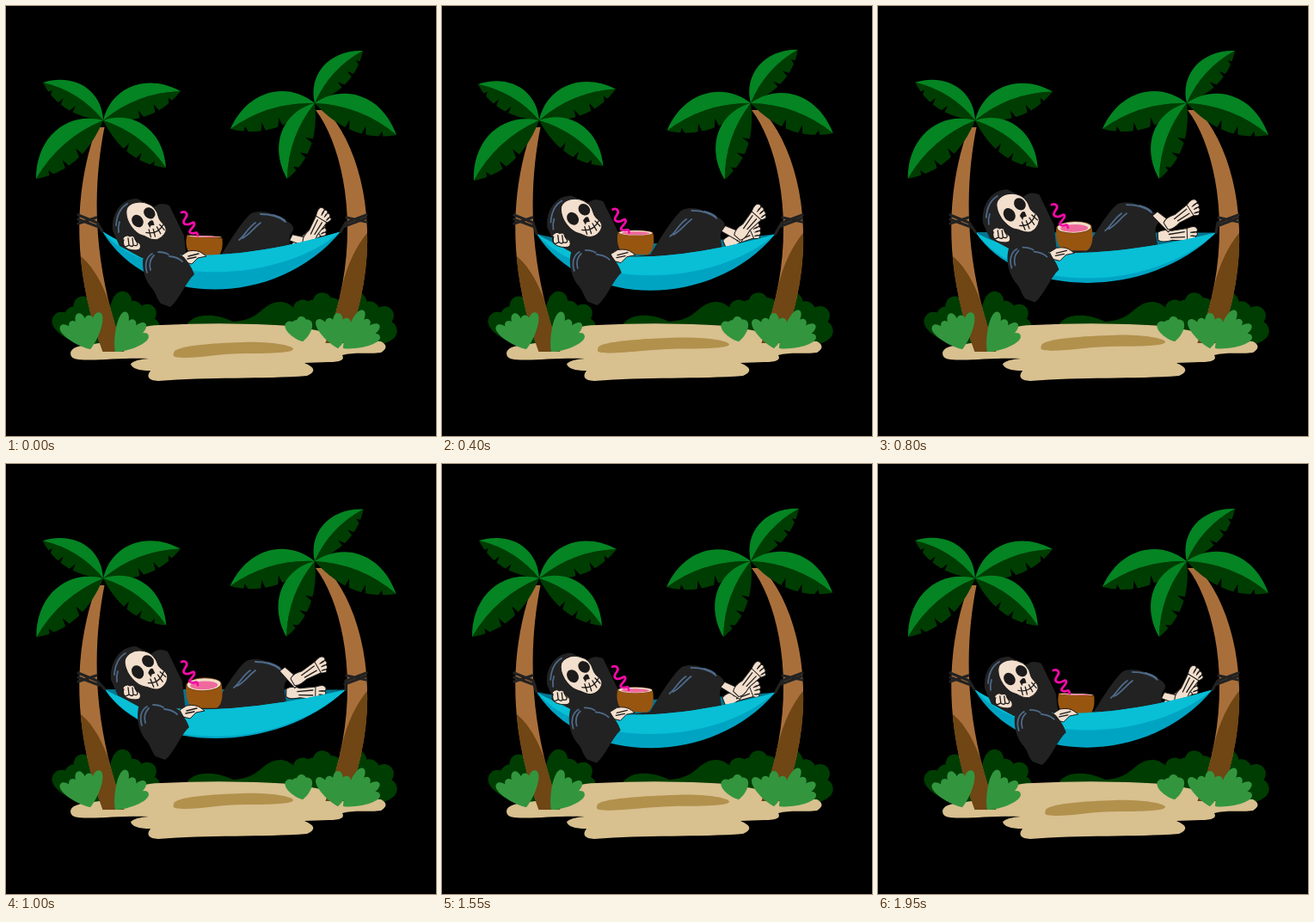
Animation of 500x500 px, one loop 2 s. Source, as an HTML page:

```html
<!DOCTYPE html>
<html lang="en">
<head>
<meta charset="utf-8">
<title>Hammock</title>
<style>
  html, body { margin: 0; width: 100%; height: 100%; overflow: hidden; background: #000; }
  svg { display: block; width: 100vw; height: 100vh; }
  [data-move] { transform-box: fill-box; transform-origin: center; }
  .robe { fill: #222; }
  .fold { fill: none; stroke: #4e6a8a; stroke-width: 1.8; stroke-linecap: round; }
  .bone { fill: #f3dfcd; stroke: #1c1a1a; stroke-width: 1; stroke-linejoin: round; }
  .ink { fill: none; stroke: #1c1a1a; stroke-width: 1.3; stroke-linecap: round; }
  .hole { fill: #1c1a1a; }
  .rope { fill: none; stroke: #222; stroke-width: 3.2; stroke-linecap: round; }
  .lit { fill: #048422; }
  .dim { fill: #003d02; }
  .grass { fill: #33963f; }
  .bark { fill: #a96f3b; }
  .shade { fill: #6f4614; }
</style>
</head>
<body>
<svg viewBox="0 0 500 500">
  <defs>
    <g id="foot">
      <path class="bone" d="M0 -5Q6 -9 16 -6L34 -8Q40 0 36 7L16 5Q4 8 0 4Z"/>
      <path class="bone" d="M34 -8Q44 -12 46 -7T38 -3Q46 -5 46 -1T38 1Q45 0 44 4T36 5Q42 5 41 8T34 7Z"/>
      <path class="ink" d="M13 -2L31 -4M15 2L31 2"/>
    </g>
    <clipPath id="clipL"><path id="trunkL"/></clipPath>
    <clipPath id="clipR"><path id="trunkR"/></clipPath>
  </defs>

  <g id="backBush" class="dim"></g>
  <path class="dim" d="M210 371C218 358 240 356 264 367C285 366 292 358 302 350C318 338 337 343 346 371Z"/>
  <path fill="#d8c08f" d="M75 404C76 391 108 396 132 386C150 377 160 371 180 371Q255 367 335 372C370 378 410 390 436 390Q447 396 436 403C420 405 405 402 391 406Q396 414 375 414L347 415Q366 423 350 430C300 434 235 431 177 436Q160 435 168 424Q147 424 145 416Q150 411 166 410C130 409 105 413 84 411Q75 410 75 404Z"/>
  <path id="shadow" fill="#b2914d"/>

  <use href="#trunkL" class="bark"/>
  <path class="shade" clip-path="url(#clipL)" d="M75 283C96 294 110 315 122 351L140 410H75Z"/>
  <use href="#trunkR" class="bark"/>
  <path class="shade" clip-path="url(#clipR)" d="M425 258C409 275 397 299 391 326L365 400H425Z"/>
  <g id="crownL"></g>
  <g id="crownR"></g>
  <g id="frontBush" class="grass"></g>

  <path id="farSide" fill="#00758f"/>

  <!-- data-move: drift, arc, drop, tilt, squash -->
  <path class="robe" data-move="1 2 7 0 0" d="M122 255C120 236 132 219 150 219L168 228Q176 220 187 225L204 260L208 296L166 302L136 280Z"/>
  <g data-move="3 4 6 0 0">
    <path class="robe" d="M205 292L241 287C250 273 265 247 277 236C286 230 302 234 312 240C325 246 331 251 325 258C320 264 324 272 326 290L250 300Z"/>
    <path class="fold" d="M264 266C270 262 274 252 283 246M268 264C276 260 281 252 289 246M289 236C301 236 311 239 318 245M304 237Q312 239 317 243"/>
  </g>
  <g data-move="2 2 1 -19 0"><use href="#foot" transform="translate(327 275) rotate(-18)"/></g>
  <g data-move="4 0 9 -14 0">
    <path class="bone" d="M323 257L328 251L350 262L345 272Z"/>
    <use href="#foot" transform="translate(341 266) rotate(-44)"/>
  </g>

  <!-- drink -->
  <g data-move="0 6 5 2 -.08">
    <path fill="#985510" d="M204 261L245 263C247 276 244 286 238 288L211 287C204 282 202 272 204 261Z"/>
    <g data-move="0 0 0 0 -.75" fill="#70400d">
      <ellipse cx="224.5" cy="262" rx="20.5" ry="4.2"/>
      <ellipse cx="224.5" cy="262" rx="19.5" ry="3.7" fill="#f0dcc8"/>
      <ellipse cx="224.5" cy="262.6" rx="16" ry="2.6" fill="#ef6a9c"/>
    </g>
  </g>
  <path data-move="0 6 5 0 0" fill="none" stroke="#f50aa8" stroke-width="2.8" stroke-linecap="round" d="M198 235C203 233 206 237 203 241S199 248 204 249S212 244 213 248S204 257 209 259S216 255 217 262"/>

  <path id="nearSide" fill="#00a4c3"/>
  <path id="band" fill="#08bfd6"/>

  <!-- hood, skull and the hand under it -->
  <g data-move="1 1 5 0 0">
    <path class="robe" d="M122 256C120 235 133 219 150 219L174 230L186 256L196 284L156 288L130 274Z"/>
    <path class="fold" d="M126 250C127 237 132 229 139 225M129 258Q128 252 130 246"/>
  </g>
  <g data-move="0 1 5 5 -.05">
    <path class="bone" d="M138 236C137 226 149 221 159 223C169 225 174 231 176 239C178 246 187 247 186 255C185 261 179 267 173 267C167 267 164 264 159 263C150 261 139 249 138 236Z"/>
    <ellipse class="hole" cx="152" cy="246" rx="6.4" ry="8" transform="rotate(-35 152 246)"/>
    <ellipse class="hole" cx="165" cy="235" rx="6.2" ry="7.4" transform="rotate(-45 165 235)"/>
    <path class="hole" d="M164 248Q167 242 170 244L172 249L168 250L167 253Z"/>
    <path class="ink" d="M163 259Q176 261 182 248M166 255L169 264M171 254L174 263M175 251L180 259M178 248L184 254"/>
  </g>
  <g data-move="0 8 5 0 0">
    <path class="bone" d="M128 265Q132 260 136 263Q141 261 142 266L148 272Q150 279 143 279Q133 279 129 274Z"/>
    <path class="ink" d="M129 267Q126 273 131 275L135 273L134 265M135 273Q139 276 140 273L139 265M140 273Q145 275 145 271L142 266"/>
  </g>

  <!-- hanging arm -->
  <g data-move="1 8 2 0 0">
    <path class="bone" d="M195 288L203 283Q214 281 220 286L224 289L214 291L207 298L199 296Z"/>
    <path class="ink" d="M203 289L215 286M202 292L212 290"/>
  </g>
  <g data-move="3 9 3 0 0">
    <path class="robe" d="M149 283C162 276 183 280 195 289C200 295 204 301 207 309C197 318 190 338 179 347L168 343C162 336 163 330 155 322C147 311 145 294 149 283Z"/>
    <path class="fold" d="M152 307C149 298 151 289 158 285M156 304C154 297 156 291 160 287M178 288Q188 289 193 294M165 283Q172 283 177 286"/>
  </g>
  <path id="ropes" class="rope"/>
</svg>
<script>
const LOOP = 2000, STEP = 50;
const $ = id => document.getElementById(id);
const mix = (a, b, u) => a.map((v, i) => v + (b[i] - v) * u);
const quad = (a, c, b, u) => mix(mix(a, c, u), mix(c, b, u), u);
const cubic = (a, b, c, d, u) => mix(quad(a, b, c, u), quad(b, c, d, u), u);
const range = n => [...Array(n).keys()];

// A trunk widens downwards along a curved spine.
function trunk(id, spine, top, bottom) {
  const side = sign => range(21).map(i => {
    const u = i / 20, [x, y] = cubic(...spine, u);
    return [x + sign * (top + (bottom - top) * u * (2 - u)) / 2, y];
  });
  $(id).setAttribute('d', `M${side(-1).concat(side(1).reverse()).join('L')}Z`);
}
trunk('trunkL', [[110, 141], [92, 205], [85, 295], [125, 402]], 9, 25);
trunk('trunkR', [[366, 121], [404, 165], [430, 275], [384, 392]], 12, 25);

// A palm leaf arches upwards over its chord; the dim underside has notches.
function leaf(base, tip) {
  const [dx, dy] = [tip[0] - base[0], tip[1] - base[1]];
  const up = dx > 0 ? 1 : -1;
  const at = (along, rise) => [
    base[0] + dx * along + up * dy * rise,
    base[1] + dy * along - up * dx * rise
  ];
  const rib = at(.5, .17), under = at(.55, -.27);
  const edge = range(41).map(i => {
    const u = i / 40, p = quad(tip, under, base, u);
    return i % 8 === 7 && i < 30 ? mix(p, quad(tip, rib, base, u), .45) : p;
  });
  return `<path class="dim" d="M${base}Q${rib} ${tip}L${edge.join(' ')}Z"/>
    <path class="lit" d="M${base}C${at(.23, .34)} ${at(.69, .36)} ${tip}Q${rib} ${base}Z"/>`;
}
const crown = (id, base, tips) => $(id).innerHTML = tips.map(tip => leaf(base, tip)).join('');
crown('crownL', [113, 133], [[43, 89], [203, 99], [35, 201], [186, 188]]);
crown('crownR', [359, 113], [[415, 52], [261, 143], [454, 150], [327, 201]]);

// A fan of blades growing from one root.
function fan(id, x, y, count, from, to, size, w) {
  $(id).innerHTML += range(count).map(i => {
    const angle = from + (to - from) * i / (count - 1);
    const h = size * (i % 2 ? .9 : 1);
    return `<path transform="translate(${x} ${y}) rotate(${angle})"
      d="M0 0C${-w} ${-h * .3} ${-w * 1.4} ${-h} 0 ${-h}S${w} ${-h * .3} 0 0"/>`;
  }).join('');
}
fan('backBush', 105, 396, 4, -54, 0, 61, 14);
fan('backBush', 126, 396, 4, 10, 62, 65, 14);
fan('backBush', 372, 391, 4, -35, 10, 58, 14);
fan('backBush', 404, 392, 4, 5, 70, 59, 14);
fan('frontBush', 98, 399, 5, -52, 14, 44, 7);
fan('frontBush', 127, 402, 4, 15, 63, 48, 7);
fan('frontBush', 345, 390, 4, -40, 15, 29, 7);
fan('frontBush', 386, 398, 4, -36, 18, 41, 7);
fan('frontBush', 392, 398, 4, 28, 72, 50, 7);

// s runs from 1 (swung near) to -1 (swung far).
const parts = [...document.querySelectorAll('[data-move]')].map(el =>
  [el, ...el.dataset.move.split(' ').map(Number)]);

function hammock(s) {
  const s2 = s * s;
  const left = [110 - 1.5 * s + 3.5 * s2, 265 - 3 * s2];
  const right = [388 - 3 * s + 4 * s2, 265.5 - 3 * s2];
  const down = (x, y) => `C165 ${y} ${x} ${y} ${right}`;
  const back = (x, y) => `C${x} ${y} 165 ${y} ${left}Z`;
  const rim = 300 + 3 * s - 4 * s2;
  const belly = 351 + 7 * s - 6 * s2;
  const crease = 331 - 5 * s - s2;
  const far = 274 + 18 * s + 6 * s2;
  const set = (id, d) => $(id).setAttribute('d', d);
  set('farSide', `M${left}${down(265, far)}${back(265, rim + 4)}`);
  set('nearSide', `M${left}${down(265, rim)}${back(315, belly)}`);
  set('band', `M${left}${down(265, rim)}${back(315, crease)}`);
  set('ropes', `M84 243L106 252L${left}M84 253L105 246M84 248L108 257
    M419 243L395 252L${right}M419 251L396 246M418 247L394 256`);

  const x = 180 + 15 * s2, y = 393 + 4 * s + 3 * s2;
  set('shadow', `M${x} ${y + 3}C${x + 2} ${y - 5} 240 ${y - 8} 275 ${y - 9}
    S334 ${y - 5} 334 ${y - 1}S310 ${y + 4} 280 ${y + 4}
    S${x + 32} ${y + 9} ${x + 14} ${y + 9}S${x} ${y + 6} ${x} ${y + 3}Z`);
}

const wobble = (dt, size, period) =>
  dt < 0 ? 0 : -size * Math.sin(2 * Math.PI * dt / period) * Math.exp(-dt / 350);

function draw(now) {
  const t = Math.floor(now % LOOP / STEP) * STEP;
  const s = Math.cos(2 * Math.PI * t / LOOP);
  hammock(s);
  for (const [el, drift, arc, drop, tilt, squash] of parts) {
    el.style.transform = `translate(${drift * s + arc * s * s}px, ${drop * s}px)
      rotate(${tilt * s}deg) scaleY(${1 + squash * s})`;
  }
  $('crownL').setAttribute('transform', `rotate(${wobble(t - 200, 3, 650)} 113 133)`);
  $('crownR').setAttribute('transform', `rotate(${wobble(t - 350, 4, 900)} 359 113)`);
}

const start = performance.now();
function tick() {
  draw(performance.now() - start);
  requestAnimationFrame(tick);
}
tick();
</script>
</body>
</html>
```
